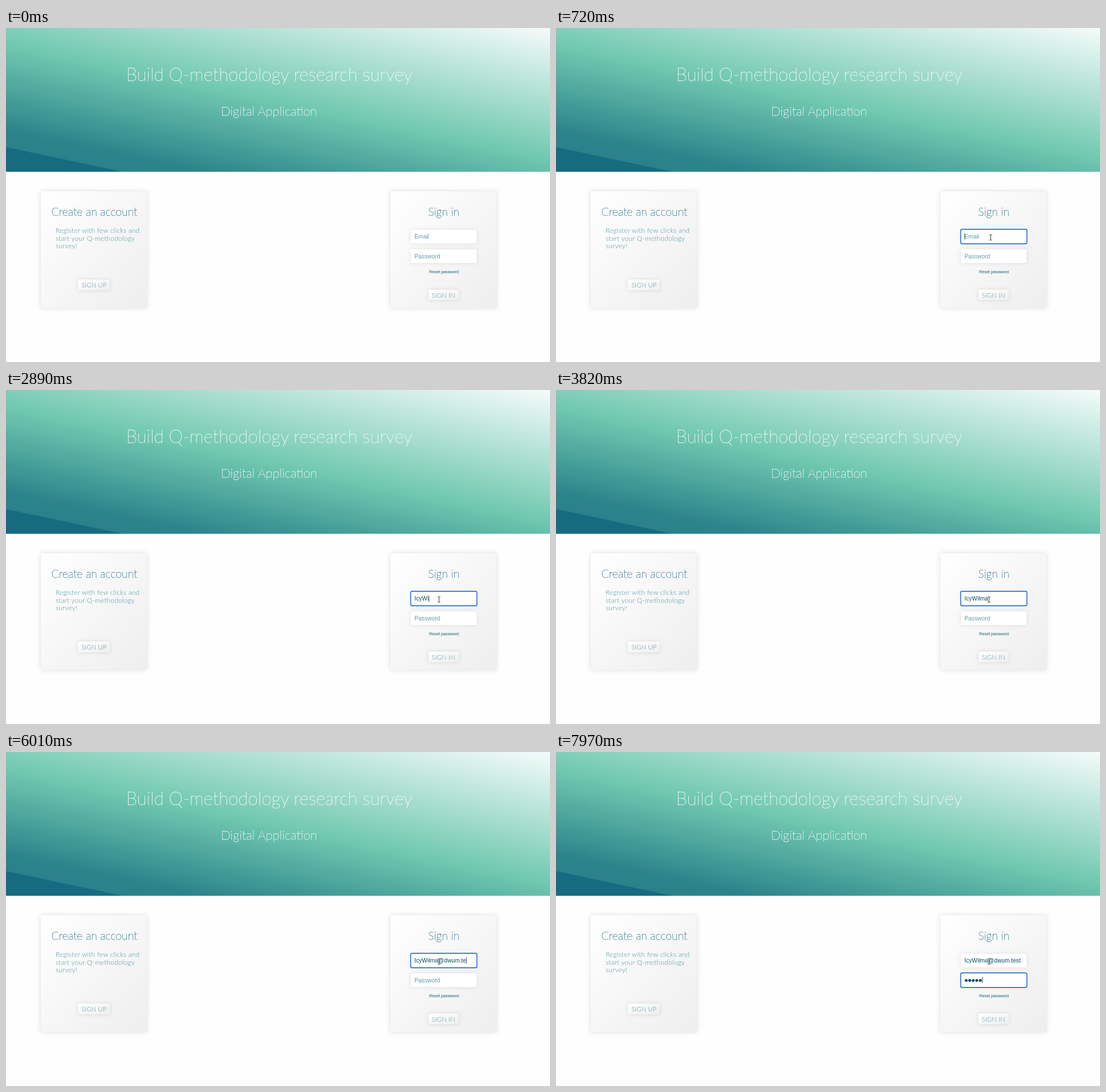
An HTML page for the animation above (8000 ms loop, 954 px wide and 587 px high).

```html
<!DOCTYPE html>
<html lang="en">
<head>
<meta charset="utf-8">
<title>Sign in</title>
<style>
  html, body { margin: 0; width: 100%; height: 100%; overflow: hidden; background: #fefefe; }
  svg { display: block; width: 100%; height: 100%; }
  .head { font-family: Lato, sans-serif; font-weight: 100; text-anchor: middle; fill: #fff; stroke: #fff; stroke-width: .35px; }
  .title { font-size: 19.5px; fill: #17697f; stroke: #17697f; stroke-width: .3px; }
  .copy { font: 300 11.9px Lato, sans-serif; letter-spacing: .23px; fill: #4a909b; }
  .label { font: 300 11px Lato, sans-serif; letter-spacing: .25px; text-anchor: middle; fill: #4a909b; }
  .link { font: 7.25px "Liberation Sans", Arial, sans-serif; text-anchor: middle; fill: #0a6472; }
  .entry { font: 10.24px "Liberation Sans", Arial, sans-serif; fill: #0a4d62; }
  .hint { fill: #5f9fa9; }
  .card { filter: drop-shadow(0 0 4.5px rgba(0,0,0,.13)) drop-shadow(.6px .7px .6px rgba(0,0,0,.15)); }
  .button { filter: drop-shadow(0 0 3px rgba(0,0,0,.11)) drop-shadow(.4px .6px .6px rgba(0,0,0,.09)); }
  .field { fill: #fff; filter: drop-shadow(0 .5px 3.5px rgba(0,0,0,.1)); }
</style>
</head>
<body>
<svg viewBox="0 0 954 587">
  <defs>
    <linearGradient id="sky" gradientUnits="userSpaceOnUse" x1="430.7" y1="344.5" x2="523.3" y2="-91.5">
      <stop offset=".096" stop-color="#166b80"/>
      <stop offset=".096" stop-color="#2a818a"/>
      <stop offset=".16" stop-color="#2c848b"/>
      <stop offset=".49" stop-color="#70c8b0"/>
      <stop offset="1" stop-color="#f5fbfa"/>
    </linearGradient>
    <linearGradient id="paper" x1="0" y1="0" x2="1" y2="1">
      <stop offset="0" stop-color="#fff"/>
      <stop offset="1" stop-color="#eee"/>
    </linearGradient>
  </defs>

  <rect width="954" height="587" fill="#fefefe"/>
  <rect width="954" height="252.7" fill="url(#sky)"/>
  <text class="head" x="461.5" y="93" font-size="31.4">Build Q-methodology research survey</text>
  <text class="head" x="461.3" y="154" font-size="22.05">Digital Application</text>

  <g fill="url(#paper)">
    <rect class="card" x="61" y="287" width="186" height="205" rx="1.5"/>
    <rect class="card" x="674" y="287" width="186" height="205" rx="1.5"/>
    <rect class="button" x="126" y="442" width="56.5" height="19.5" rx="1.5"/>
    <rect class="button" x="740.5" y="459.5" width="53.5" height="19" rx="1.5"/>
  </g>

  <text class="head title" x="155" y="329.8">Create an account</text>
  <text class="copy">
    <tspan x="87" y="360">Register with few clicks and</tspan>
    <tspan x="87" y="373.7">start your Q-methodology</tspan>
    <tspan x="87" y="387">survey!</tspan>
  </text>
  <text class="label" x="154.3" y="456.3">SIGN UP</text>

  <text class="head title" x="767.7" y="329.8">Sign in</text>
  <rect class="field" x="710" y="354.5" width="115.3" height="24" rx="2"/>
  <rect class="field" x="710" y="389" width="115.3" height="24" rx="2"/>
  <text class="link" x="768" y="431">Reset password</text>
  <text class="label" x="767.3" y="473.5">SIGN IN</text>

  <rect id="ring" x="709.7" y="353.7" width="116.1" height="25.6" rx="2.5" fill="none" stroke="#1763c0" stroke-width="1.4"/>
  <text id="mailHint" class="entry hint" x="716.3" y="370">Email</text>
  <text id="passHint" class="entry hint" x="716.3" y="404.5">Password</text>
  <text id="mail" class="entry" x="716.3" y="370"></text>
  <g id="dots" fill="#0a4d62"></g>
  <rect id="caret" width=".9" height="11" fill="#2a4650"/>

  <g id="cursor">
    <path id="arrow" d="M0 0V11L2.6 8.7L4.4 12.6L6 11.9L4.3 8.1H7.7Z" fill="#fff" stroke="#222" stroke-width=".8"/>
    <path id="beam" d="M-2.3 -4.8H-.6L0 -4.3L.6 -4.8H2.3M0 -4.3V4.3M-2.3 4.8H-.6L0 4.3L.6 4.8H2.3" fill="none" stroke="#333" stroke-width="1"/>
  </g>
</svg>
<script>
const LOOP = 8000, FOCUS = 590, TAB = 6530, LEFT = 716.3, PITCH = 6.15;
const ADDRESS = "IcyWilma@dwum.test";

// Times at which each next character lands
const MAIL_KEYS = [1580, 1840, 1970, 2630, 2890, 3090, 3290, 3620, 4350,
                   5010, 5140, 5340, 5470, 5740, 5940, 6010, 6070, 6200];
const PASS_KEYS = [6990, 7320, 7580, 7710, 7970];
const CARET_OFF = [[1120, 1580], [2230, 2630], [3820, 4350], [4880, 5010]];
const MOVES = [70, 130, 200, 260, 330, 390, 460, 590, 660, 720, 790, 860];

const $ = id => document.getElementById(id);
const show = (el, on) => el.setAttribute("visibility", on ? "visible" : "hidden");
const typed = (keys, t) => keys.filter(k => k <= t).length;
const mix = (a, b, p) => a + (b - a) * p;

for (let i = 0; i < PASS_KEYS.length; i++) {
  const dot = document.createElementNS("http://www.w3.org/2000/svg", "circle");
  dot.setAttribute("cx", 719.4 + i * PITCH);
  dot.setAttribute("cy", 401.4);
  dot.setAttribute("r", 2.5);
  $("dots").append(dot);
}

function pointer(t) {
  const step = MOVES.filter(m => m <= t).pop();
  if (step < 460) {
    const p = 1 - (1 - (step - 70) / 390) ** 1.7;
    return [mix(911, 768, p), mix(560, 367.5, p)];
  }
  const p = (step - 460) / 400;
  return [mix(768, 759.3, p), mix(367.5, 368.3, p)];
}

function drawCursor(t) {
  const [x, y] = t < 70 ? [-50, -50] : pointer(t);
  const inField = x > 710 && x < 825 && ((y > 354 && y < 379) || (y > 389 && y < 413));
  show($("arrow"), !inField);
  show($("beam"), inField);
  $("cursor").setAttribute("transform", `translate(${x} ${y})`);
}

function draw(t) {
  const n = typed(MAIL_KEYS, t), dots = typed(PASS_KEYS, t), onPass = t >= TAB;
  const mail = $("mail");
  mail.textContent = ADDRESS.slice(0, n);
  mail.setAttribute("opacity", t < 1640 ? .6 : 1);
  show($("mailHint"), n === 0);
  show($("passHint"), dots === 0);
  [...$("dots").children].forEach((dot, i) => show(dot, i < dots));
  $("dots").setAttribute("opacity", t < 7120 ? .6 : 1);

  show($("ring"), t >= FOCUS);
  $("ring").setAttribute("y", onPass ? 388.2 : 353.7);

  const width = onPass ? dots * PITCH : n ? mail.getComputedTextLength() : 0;
  $("caret").setAttribute("x", LEFT + width);
  $("caret").setAttribute("y", onPass ? 395.3 : 361);
  show($("caret"), t >= FOCUS && !CARET_OFF.some(([a, b]) => t >= a && t < b));

  drawCursor(t);
}

const start = performance.now();
function tick() {
  draw((performance.now() - start) % LOOP);
  requestAnimationFrame(tick);
}
tick();
</script>
</body>
</html>
```
